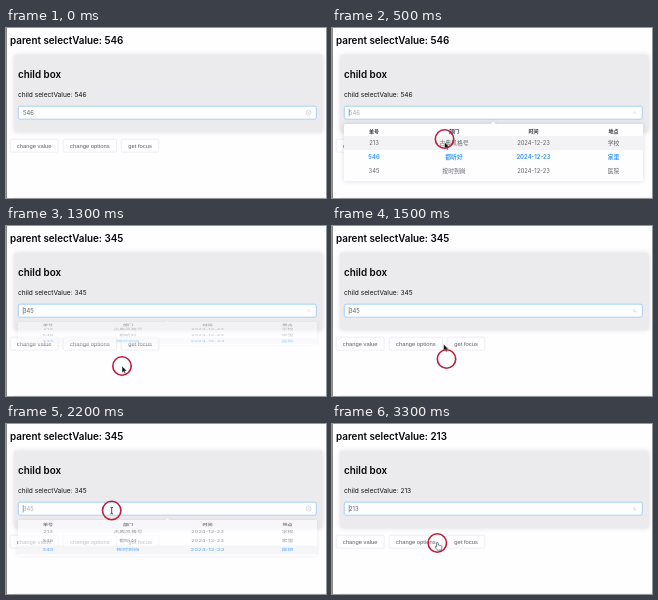
These frames come from a looping animation (320 px wide and 170 px high, 3.4 s). An HTML page:

```html
<!DOCTYPE html>
<html lang="zh-CN">
<head>
<meta charset="utf-8">
<style>
html, body { margin: 0; width: 100%; height: 100%; overflow: hidden; background: #fefdff; }
svg { display: block; width: 320px; height: 170px; }
text { font-family: Inter, "Noto Sans CJK SC", "Noto Sans CJK", sans-serif; font-size: 5.83px; fill: #606266; }
.heading { font-size: 9.85px; font-weight: 600; fill: #050506; }
.label { font-size: 6.6px; fill: #111; }
.button text { font-family: "Liberation Sans", Arial, sans-serif; text-anchor: middle; }
.button rect { fill: #fefdff; stroke: #dcdfe6; stroke-width: .5; }
.cell { text-anchor: middle; }
.head { font-size: 5px; font-weight: 700; fill: #333; }
.selected { font-weight: 700; fill: #409eff; }
.icon { fill: none; stroke: #c0c4cc; stroke-width: .55; }
.box { filter: drop-shadow(0 .5px 2.5px rgba(0,0,0,.14)); }
</style>
</head>
<body>
<svg id="stage" viewBox="0 0 320 170">
  <rect width="320" height="170" fill="#fefdff"/>
  <rect x="8" y="169" width="312" height="1" fill="#f3f3f3"/>
  <rect width=".7" height="170" fill="#555"/>
  <text class="heading" x="4" y="16">parent selectValue: <tspan class="value"/></text>
  <rect class="box" x="8.5" y="27" width="308" height="77" rx="1" fill="#ebeaed"/>
  <text class="heading" x="12" y="50">child box</text>
  <text class="label" x="12" y="69">child selectValue: <tspan class="value"/></text>
  <rect x="12.3" y="78.2" width="298" height="13" rx="1.7" fill="#fefdff" stroke="#84c3f5" stroke-width=".7"/>
  <text id="input" class="value" x="17" y="86.9"/>
  <path id="caret" d="M17.2 81V88.4" stroke="#444" stroke-width=".5"/>
  <g id="clear" class="icon" transform="translate(302.5 84.8)">
    <circle r="2.4"/><path d="M-.9-.9.9.9M.9-.9-.9.9"/>
  </g>
  <path id="chevron" class="icon" d="M-1.9-.9 0 .9 1.9-.9"/>
  <g id="buttons"></g>
  <g id="panel">
    <g class="box" fill="#fefdff">
      <rect x="12" y="96" width="299" height="57" rx="1.5"/>
      <path d="M158.6 96.2 161.3 93.6 164 96.2Z"/>
    </g>
    <rect id="hover" x="12" width="299" height="14" fill="#f3f3f6"/>
  </g>
  <g id="pointer">
    <path id="arrow" d="M0 0V7L1.6 5.5 2.7 8 3.8 7.5 2.7 5.1H5Z" fill="#111" stroke="#fff" stroke-width=".5"/>
    <path id="beam" d="M-1.3-3.2Q0-3.2 0-2.4 0-3.2 1.3-3.2M0-2.6V2.8M-1.3 3.4Q0 3.4 0 2.6 0 3.4 1.3 3.4" fill="none" stroke="#222" stroke-width=".8"/>
    <path id="hand" d="M-.6-.4Q.3-1.2.9 0V2.2Q1.8 1.7 2.2 2.4 3 2 3.4 2.7 4.5 2.5 4.5 3.5V5.2L3.6 7.2H.2L-2.3 4Q-2 2.8-.7 3.8Z" fill="#fff" stroke="#333" stroke-width=".6"/>
  </g>
  <circle id="ring" r="9.2" fill="none" stroke="#bd1c3b" stroke-width="1.6"/>
</svg>
<script>
const LOOP = 3400, STEP = 100, RING_LAG = 100;
const OPEN_TIMES = [145, 2145], CLOSE_TIMES = [1250, 3050], TRANSITION = 300;
const FIRST_PICK = 1300, SECOND_PICK = 3100;
const ROW_TOP = 108, ROW_HEIGHT = 14;
const COLUMNS = [42, 122, 201.5, 281.5];
const HEADERS = ['单号', '部门', '时间', '地点'];
const ROWS = [
  ['213', '古典风格号', '2024-12-23', '学校'],
  ['546', '都听好', '2024-12-23', '家里'],
  ['345', '按时到岗', '2024-12-23', '医院']
];
// time, x, y
const PATH = [
  [0, 110, 83], [300, 110, 86], [400, 112.5, 111], [500, 112.5, 114],
  [650, 115, 126], [800, 115.3, 135], [900, 115.3, 136.2], [1100, 116, 140],
  [1300, 116, 140], [1400, 114.5, 133], [1500, 111.5, 118], [1700, 105.7, 86.5],
  [2300, 105.7, 86.5], [2400, 105.5, 92], [2500, 104.8, 119],
  [2800, 105, 117], [3100, 105.3, 119], [3400, 105.3, 119]
];

const $ = id => document.getElementById(id);
const clamp = v => Math.max(0, Math.min(1, v));
const within = (t, a, b) => t >= a && t < b;
const show = (id, visible) => $(id).setAttribute('visibility', visible ? 'visible' : 'hidden');
const move = (id, [x, y]) => $(id).setAttribute('transform', `translate(${x} ${y})`);
const easeOut = p => 1 - (1 - p) ** 5;

function add(parent, tag, attrs, content = '') {
  const node = document.createElementNS('http://www.w3.org/2000/svg', tag);
  for (const key in attrs) node.setAttribute(key, attrs[key]);
  node.textContent = content;
  return parent.appendChild(node);
}

function addButton(x, width, label) {
  const group = add($('buttons'), 'g', { class: 'button' });
  add(group, 'rect', { x, y: 111.2, width, height: 13, rx: 1.6 });
  add(group, 'text', { x: x + width / 2, y: 119.6 }, label);
}

function addCells(cells, y, kind) {
  return cells.map((cell, i) => add($('panel'), 'text', { x: COLUMNS[i], y, class: 'cell ' + kind }, cell));
}

addButton(4.2, 48, 'change value');
addButton(57.2, 53.3, 'change options');
addButton(115.2, 37.6, 'get focus');
addCells(HEADERS, 105, 'head');
const rowCells = ROWS.map((row, i) => addCells(row, ROW_TOP + 9.1 + ROW_HEIGHT * i, ''));
const valueNodes = document.querySelectorAll('.value');

function pathAt(t) {
  const i = Math.max(1, PATH.findIndex(key => key[0] >= t));
  const [t0, x0, y0] = PATH[i - 1], [t1, x1, y1] = PATH[i];
  const k = clamp((t - t0) / (t1 - t0));
  return [x0 + (x1 - x0) * k, y0 + (y1 - y0) * k];
}

// Progress of the panel's latest open or close transition.
function panelState(t) {
  const cycle = t < 1900 ? 0 : 1;
  const closing = t >= CLOSE_TIMES[cycle];
  const start = (closing ? CLOSE_TIMES : OPEN_TIMES)[cycle];
  const p = clamp((t - start) / TRANSITION);
  const turn = clamp((t - start - 50) / TRANSITION);
  return {
    open: closing ? 1 - easeOut(p) : easeOut(p),
    angle: 180 * (closing ? 1 - turn : turn),
    active: !closing && t >= start
  };
}

// The last hovered row keeps its highlight after the pointer leaves.
function hoveredRow(t, y) {
  const row = Math.floor((y - ROW_TOP) / ROW_HEIGHT);
  if (row >= 0 && row < ROWS.length && !within(t, FIRST_PICK, OPEN_TIMES[1])) return row;
  return t < FIRST_PICK ? -1 : 2;
}

function render(t) {
  const value = t < FIRST_PICK ? '546' : t < SECOND_PICK ? '345' : '213';
  const { open, angle, active } = panelState(t);
  valueNodes.forEach(node => node.textContent = value);
  $('input').style.fill = active ? '#a8abb2' : '#606266';
  show('caret', t >= 200 && !within(t, 700, 1200) && !within(t, 1700, 2200) && !within(t, 2700, 3000));

  const clearable = t < 400 || within(t, 1700, 2500);
  show('clear', clearable);
  show('chevron', !clearable);
  $('chevron').setAttribute('transform', `translate(302.5 84.8) rotate(${angle})`);

  show('panel', open > .01);
  $('panel').setAttribute('opacity', open);
  $('panel').setAttribute('transform', `translate(0 ${96 * (1 - open)}) scale(1 ${open})`);
  ROWS.forEach((row, i) => rowCells[i].forEach(cell =>
    cell.setAttribute('class', row[0] === value ? 'cell selected' : 'cell')));

  const point = pathAt(t);
  const hovered = hoveredRow(t, point[1]);
  $('hover').setAttribute('y', ROW_TOP + ROW_HEIGHT * hovered);
  $('hover').setAttribute('opacity', hovered < 0 ? 0 : 1);

  const kind = t < 100 ? '' : t >= 2500 ? 'hand' : t < 400 || t >= 1700 ? 'beam' : 'arrow';
  for (const id of ['arrow', 'beam', 'hand']) show(id, id === kind);
  move('pointer', point);
  show('ring', t >= 100);
  move('ring', pathAt(t - RING_LAG));
}

const begin = performance.now();
function tick() {
  const t = (performance.now() - begin) % LOOP;
  render(Math.floor(t / STEP) * STEP);
  requestAnimationFrame(tick);
}
tick();
</script>
</body>
</html>
```
